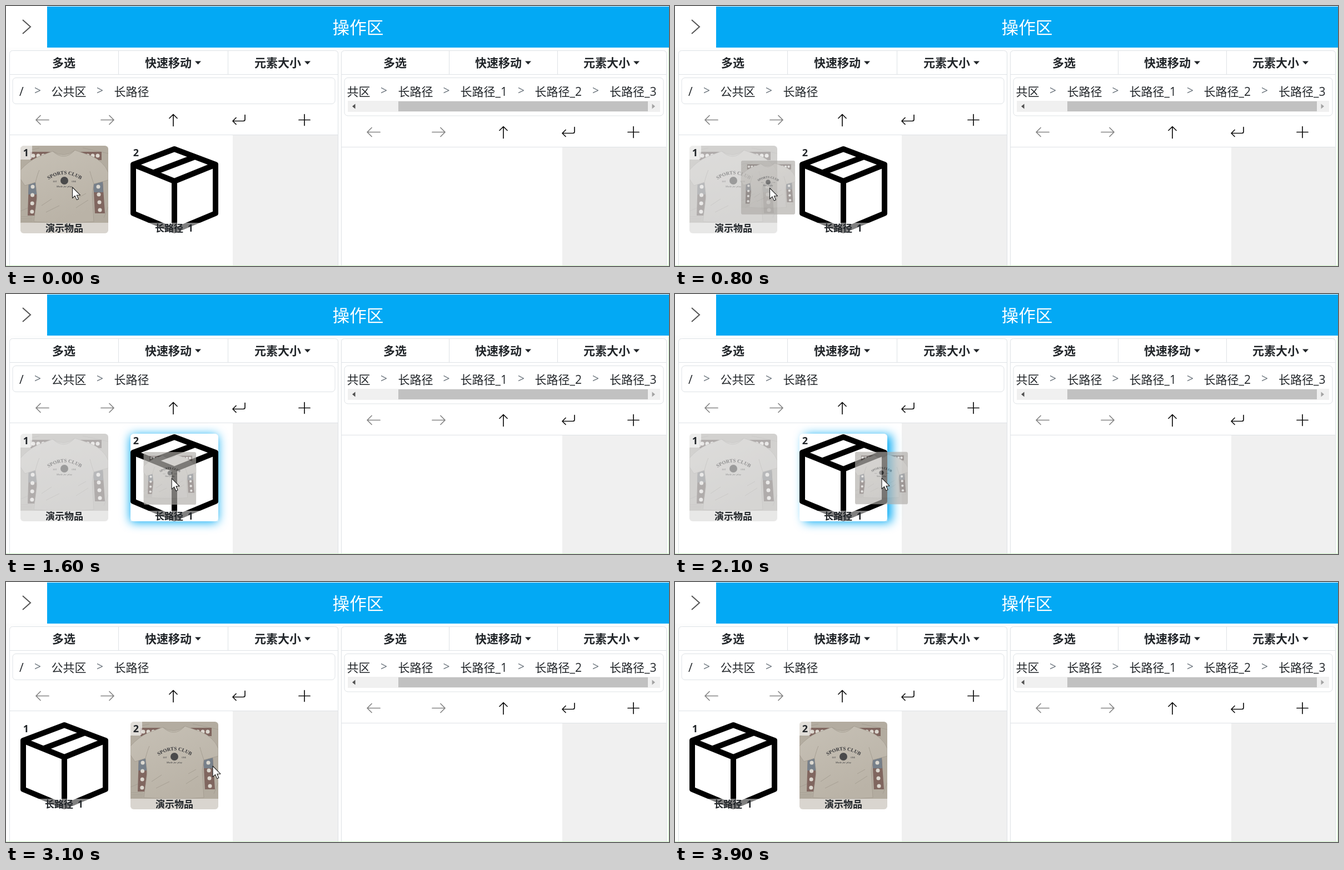
Write an HTML page that moves like this. It is 1193 px wide and 469 px high and loops after 4 s.

```html
<!DOCTYPE html>
<html lang="zh">
<head>
<meta charset="utf-8">
<style>
html, body { margin: 0; width: 100%; height: 100%; overflow: hidden; background: #fff; }
svg { display: block; width: 1193px; height: 469px; }
text { font-family: "Open Sans", "Noto Sans CJK SC", "Noto Sans CJK", sans-serif; fill: #212529; }
.bold { font-weight: 700; }
.line { fill: none; stroke: #dee2e6; }
.icon { fill: none; stroke: #111; stroke-width: 1.7; stroke-linecap: round; stroke-linejoin: round; }
.off { stroke: #858585; }
.print { font-family: "Liberation Serif", serif; fill: #37373a; }
</style>
</head>
<body>
<svg id="stage" viewBox="0 0 1193 469" xmlns="http://www.w3.org/2000/svg">
  <defs>
    <clipPath id="round"><rect width="158" height="158" rx="6"/></clipPath>
    <filter id="blur" x="-30%" y="-30%" width="160%" height="160%"><feGaussianBlur stdDeviation="9"/></filter>
    <linearGradient id="cloth" x2="0.4" y2="1">
      <stop offset="0" stop-color="#c6c0b5"/><stop offset="1" stop-color="#bab3a7"/>
    </linearGradient>
    <path id="arch" d="M51 61Q79 42 108 61"/>
    <g id="shirt" clip-path="url(#round)"></g>
    <g id="box">
      <path d="M79 6L153 34V122L79 153L5 122V34ZM5 34L79 64L153 34M79 64V153M40 49L116 20"
        fill="none" stroke="#000" stroke-width="10" stroke-linejoin="round"/>
    </g>
  </defs>
  <g id="frame"></g>
  <rect id="glow" x="224" y="252" width="158" height="158" rx="6" fill="#03a9f4" filter="url(#blur)"/>
  <rect id="plate" x="224" y="252" width="158" height="158" rx="6" fill="#fff"/>
  <g id="shirtCard">
    <use id="photo" href="#shirt"/>
    <path d="M0 139H158V152Q158 158 152 158H6Q0 158 0 152Z" fill="#fff" opacity=".5"/>
    <path d="M0 6Q0 0 6 0H21V19Q21 25 15 25H0Z" fill="#fff" opacity=".6"/>
    <text class="bold" x="79" y="155" font-size="17" text-anchor="middle">演示物品</text>
  </g>
  <g id="boxCard">
    <use href="#box"/>
    <path d="M0 139H158V158H0Z" fill="#fff" opacity=".5"/>
    <text class="bold" x="44" y="155" font-size="17">长路径</text>
    <text class="bold" x="103" y="155" font-size="17">1</text>
  </g>
  <text class="bold" x="36" y="271" font-size="18" text-anchor="middle">1</text>
  <text class="bold" x="234" y="271" font-size="18" text-anchor="middle">2</text>
  <use id="ghost" href="#shirt"/>
  <path id="cursor" d="M0 0V19.5L4.6 15.4L7.8 22.6L11 21.2L7.8 14.2H14Z" fill="#fff" stroke="#222" stroke-width="1.1" stroke-linejoin="round"/>
  <path d="M0 468.5H1193M1192.5 75V468" stroke="#cdf0c4" fill="none"/>
</svg>
<script>
const LOOP = 4000, STEP = 100;
const $ = id => document.getElementById(id);
const rect = (x, y, w, h, fill, more = '') =>
  `<rect x="${x}" y="${y}" width="${w}" height="${h}" fill="${fill}" ${more}/>`;
const text = (x, y, size, s, more = '') => `<text x="${x}" y="${y}" font-size="${size}" ${more}>${s}</text>`;
const path = (d, more) => `<path d="${d}" ${more}/>`;

function dots(x, y, dx, dy, n) {
  let s = '';
  for (let i = 0; i < n; i++) s += `<circle cx="${x + dx * i}" cy="${y + dy * i}" r="3.5" fill="#dcd8d0"/>`;
  return s;
}

function shirt() {
  const fold = 'fill="none" stroke="#a69f93" stroke-width="1"';
  const print = 'class="print" text-anchor="middle"';
  return rect(0, 0, 158, 158, '#b3aca0') +
    path('M0 12L34 4M2 26L20 8M112 4L158 14M0 118L14 112M150 130L158 110', fold) +
    rect(18, 11, 36, 15, '#80665f') + rect(106, 11, 40, 15, '#80665f') +
    dots(23, 18, 9, 0, 4) + dots(112, 18, 9, 0, 4) +
    path('M15 64H30L28 126H13Z', 'fill="#80665f"') + path('M15 64H30L29 88H14Z', 'fill="#77808a"') +
    path('M131 64H148L152 122H134Z', 'fill="#80665f"') + path('M131 64H148L149 84H132Z', 'fill="#77808a"') +
    dots(22, 74, -.4, 15, 4) + dots(140, 74, 1, 14, 4) +
    path('M1 128H22M1 132H22M1 136H22', fold) +
    path('M58 10Q79 24 98 8L126 18Q150 28 158 48V62L132 69L129 88L132 137Q80 141 24 137L30 92L27 66L8 72L0 60V44Q14 28 32 20Z',
      'fill="url(#cloth)" stroke="#a29b90" stroke-width=".8"') +
    path('M58 10Q79 29 98 8M27 66Q31 50 34 44M132 69Q127 54 125 46M38 108L56 96M46 120L70 108M100 112L122 98M104 94L118 86', fold) +
    `<text class="print" font-size="9" font-weight="700" text-anchor="middle"><textPath href="#arch" startOffset="50%">SPORTS CLUB</textPath></text>` +
    '<circle cx="79" cy="63" r="7" fill="#4a4a4b"/>' +
    text(62, 66, 4, 'EST', print) + text(96, 66, 4, 'ONE', print) +
    text(79, 75, 5, 'Made for play', print + ' font-style="italic"');
}

function tools(xs, y) {
  const [a, b, c, d, e] = xs;
  return path(`M${a + 12} ${y}h-23m8 -8l-8 8l8 8M${b - 12} ${y}h23m-8 -8l8 8l-8 8`, 'class="icon off"') +
    path(`M${c} ${y + 11}v-21m-7 7l7 -7l7 7M${d + 11} ${y - 9}v8q0 3 -3 3h-19m6 -6l-6 6l6 6M${e - 10} ${y}h20m-10 -10v20`, 'class="icon"');
}

function panel(x, right, tabs, labels, boxBottom, rule, split) {
  let s = path(`M${x} 469V86.5Q${x} 80.5 ${x + 6} 80.5H${right - 6}Q${right} 80.5 ${right} 86.5V469`, 'class="line" style="fill:#fff"');
  s += rect(split, rule + .5, right - split - .5, 469 - rule, '#f0f0f0');
  s += path(`M${tabs[0]} 81V123M${tabs[1]} 81V123M${x} 123.5H${right}M${x} ${rule}H${right}`, 'class="line"');
  ['多选', '快速移动', '元素大小'].forEach((name, i) => {
    s += text(labels[i], 110, 21, name, 'class="bold"');
    if (i) s += path(`M${labels[i] + 90} 99.5h11l-5.5 6z`, 'fill="#212529"');
  });
  return s + rect(x + 5.5, 129.5, right - x - 11, boxBottom - 129.5, '#fff', 'rx="6" stroke="#dee2e6"');
}

const crumbs = list => list.map(([x, s]) =>
  text(x, s === '&gt;' ? 160 : 162, 21, s, s === '&gt;' ? 'style="fill:#6c757d"' : '')).join('');

$('shirt').innerHTML = shirt();
$('frame').innerHTML =
  rect(0, 0, 1193, 469, '#fdfdfd') + rect(0, 0, 74, 75, '#fff') + rect(74, 1, 1119, 74, '#03a9f4') +
  path('M30 25L44 37.5L30 50', 'fill="none" stroke="#555" stroke-width="2"') +
  text(633.5, 50, 30.6, '操作区', 'text-anchor="middle" style="fill:#fff"') +
  panel(6.5, 597.5, [202.5, 399.5], [83, 250, 447], 176.5, 232.5, 408) +
  panel(603.5, 1188.5, [797.5, 992.5], [679, 844, 1039], 198, 254.5, 1001) +
  crumbs([[24, '/'], [51, '&gt;'], [81.5, '公共区'], [163, '&gt;'], [194.5, '长路径'],
    [613.5, '共区'], [674, '&gt;'], [705.5, '长路径'], [786.5, '&gt;'], [817.5, '长路径_1'],
    [921, '&gt;'], [951.5, '长路径_2'], [1055, '&gt;'], [1086, '长路径_3']]) +
  rect(615, 171, 562, 20, '#f0f0f0') + rect(706, 172, 449, 18, '#c1c1c1') +
  path('M628.5 176.5v9l-5.5 -4.5z', 'fill="#505050"') + path('M1162.5 176.5v9l5.5 -4.5z', 'fill="#a3a3a3"') +
  tools([65, 183, 301, 419, 537], 205.5) + tools([661, 779, 895, 1012, 1129], 227.5);

const DRAG = 500, HOVER = 1000, DROP = 2700, SWAP = 2900;
const pointer = [[500, 119.5, 327], [800, 170.5, 328.5], [1200, 239, 333], [2100, 372, 332], [3200, 372, 332], [3600, 390, 475]];
const center = [[500, 105, 331], [800, 167.5, 327.5], [1200, 233.5, 333], [2100, 371.5, 332]];
const size = [[500, 158], [600, 126], [700, 106], [800, 97.5], [1000, 95]];
const fade = [[400, 1], [500, .8], [700, .55], [2700, .55], [2900, .65]];

// Linear interpolation between keys of the form [time, ...values]
function at(keys, t) {
  if (t <= keys[0][0]) return keys[0].slice(1);
  for (let i = 1; i < keys.length; i++) {
    const a = keys[i - 1], b = keys[i];
    if (t <= b[0]) return b.slice(1).map((v, j) => a[j + 1] + (v - a[j + 1]) * (t - a[0]) / (b[0] - a[0]));
  }
  return keys[keys.length - 1].slice(1);
}

const set = (id, attrs) => { for (const k in attrs) $(id).setAttribute(k, attrs[k]); };
const show = (id, on) => set(id, { visibility: on ? 'visible' : 'hidden' });

function draw(t) {
  const swapped = t >= SWAP, dragging = t >= DRAG && t < DROP;
  const [px, py] = at(pointer, t), [cx, cy] = at(center, t), [w] = at(size, t);
  set('shirtCard', { transform: `translate(${swapped ? 224 : 26} 252)` });
  set('boxCard', { transform: `translate(${swapped ? 26 : 224} 252)` });
  const lit = !swapped && t > HOVER;
  show('glow', lit);
  show('plate', lit);
  set('glow', {
    opacity: Math.min(1, Math.max(0, (t - HOVER) / 400)),
    transform: `translate(${Math.max(-7, Math.min(8, (px - 303) / 8))} 2)`
  });
  const dim = !swapped && t >= DRAG;
  set('photo', { opacity: dim ? at(fade, t)[0] : 1, style: dim ? 'filter:grayscale(.75)' : '' });
  show('ghost', dragging);
  set('ghost', {
    opacity: .66, style: 'filter:grayscale(.6)',
    transform: `translate(${cx - w / 2} ${cy - w / 2}) scale(${w / 158})`
  });
  show('cursor', t < 3600);
  set('cursor', { transform: `translate(${px} ${py})` });
}

function tick() {
  draw(Math.floor(performance.now() % LOOP / STEP) * STEP);
  requestAnimationFrame(tick);
}
tick();
</script>
</body>
</html>
```
